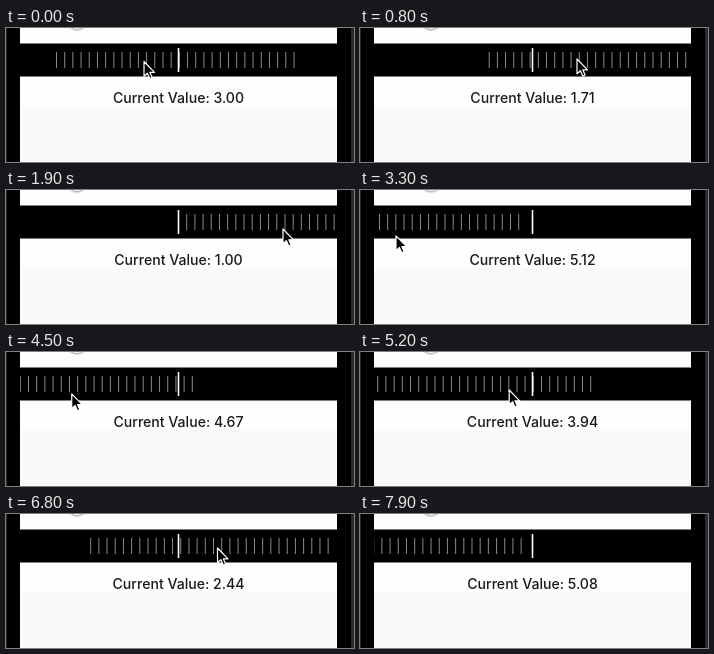
An HTML page for the animation above (8000 ms loop, 348 by 134 pixels).

```html
<!DOCTYPE html>
<html lang="en">
<head>
<meta charset="utf-8">
<title>Ruler picker</title>
<style>
html, body { margin: 0; width: 100%; height: 100%; overflow: hidden; background: #000; }
svg { display: block; width: 348px; height: 134px; }
text { font: 450 14.1px Inter, Roboto, sans-serif; fill: #1a1a1a; text-anchor: middle; }
</style>
</head>
<body>
<svg viewBox="0 0 348 134">
  <defs>
    <clipPath id="screen"><rect x="14" width="317" height="134"/></clipPath>
    <filter id="soft" x="-50%" y="-50%" width="200%" height="200%"><feGaussianBlur stdDeviation="1.3"/></filter>
  </defs>
  <rect width="348" height="134"/>
  <path d="M.5 0V134" stroke="#2a2a2a"/>
  <rect x="345" width="3" height="134" fill="#2a2a2a"/>
  <g clip-path="url(#screen)">
    <rect x="14" width="317" height="134" fill="#fafafa"/>
    <rect x="14" width="317" height="78" fill="#fefefe"/>
    <circle cx="71" cy="-8" r="10" fill="#888" filter="url(#soft)"/>
    <circle cx="71" cy="-8.7" r="9.7" fill="#fff"/>
    <rect x="14" y="15.5" width="317" height="33"/>
    <path id="ruler" stroke="#8a8a8a"/>
    <rect x="171.7" y="20" width="1.6" height="24" fill="#fff"/>
    <text id="label" x="172.5" y="75"></text>
  </g>
  <path id="cursor" d="M0 0V14.8L3.4 11.7L5.7 17L8.1 16L5.8 10.8H10.5Z" fill="#000" stroke="#fff" stroke-width="1.2" stroke-linejoin="round"/>
</svg>
<script>
const LOOP = 8000, STEP = 100;
const CENTER = 172.5, UNIT = 61, TICKS = 30, GAP = 8.19;

const linear = p => p;
const easeIn = p => p ** 1.4;
const easeOut = p => 1 - (1 - p) ** 1.6;
const easeBoth = p => p * p * (3 - 2 * p);

// time, value, cursor x, cursor y, easing towards this step
const steps = [
  [0, 3, 138, 33.5, linear],
  [800, 1.71, 217, 31, linear],
  [1900, 1, 277, 39, easeOut],
  [2100, 1, 277, 39, linear],
  [2400, 1, 279, 36, linear],
  [2600, 1, 279, 36, linear],
  [3300, 5.12, 36, 45.8, easeBoth],
  [3500, 5.16, 32, 46, easeOut],
  [4200, 4.7, 62, 42, easeBoth],
  [4400, 4.7, 62, 42, linear],
  [5200, 3.94, 149.2, 38, easeBoth],
  [5600, 3.94, 149.2, 38, linear],
  [6000, 3.94, 106, 36, easeBoth],
  [6100, 3.94, 106, 36, linear],
  [6800, 2.44, 211.5, 34, easeBoth],
  [7200, 2.44, 211.5, 34, linear],
  [7900, 5.08, 50, 37, easeIn]
];

const [ruler, label, cursor] = ["ruler", "label", "cursor"].map(id => document.getElementById(id));
ruler.setAttribute("d", Array.from({ length: TICKS }, (_, i) => `M${(i * GAP).toFixed(2)} 24V40`).join(""));

function pose(t) {
  const i = steps.findIndex(s => s[0] >= t);
  if (i < 1) return steps[0].slice(1, 4);
  const a = steps[i - 1], b = steps[i];
  const p = b[4]((t - a[0]) / (b[0] - a[0]));
  return [1, 2, 3].map(k => a[k] + (b[k] - a[k]) * p);
}

function draw(now) {
  const t = Math.floor((now % LOOP) / STEP) * STEP;
  const [value, x, y] = pose(t);
  ruler.setAttribute("transform", `translate(${CENTER - (value - 1) * UNIT} 0)`);
  label.textContent = "Current Value: " + value.toFixed(2);
  cursor.setAttribute("transform", `translate(${x} ${y})`);
  cursor.style.visibility = t < 7900 ? "visible" : "hidden";
}

const start = performance.now();
function tick() {
  draw(performance.now() - start);
  requestAnimationFrame(tick);
}
tick();
</script>
</body>
</html>
```
